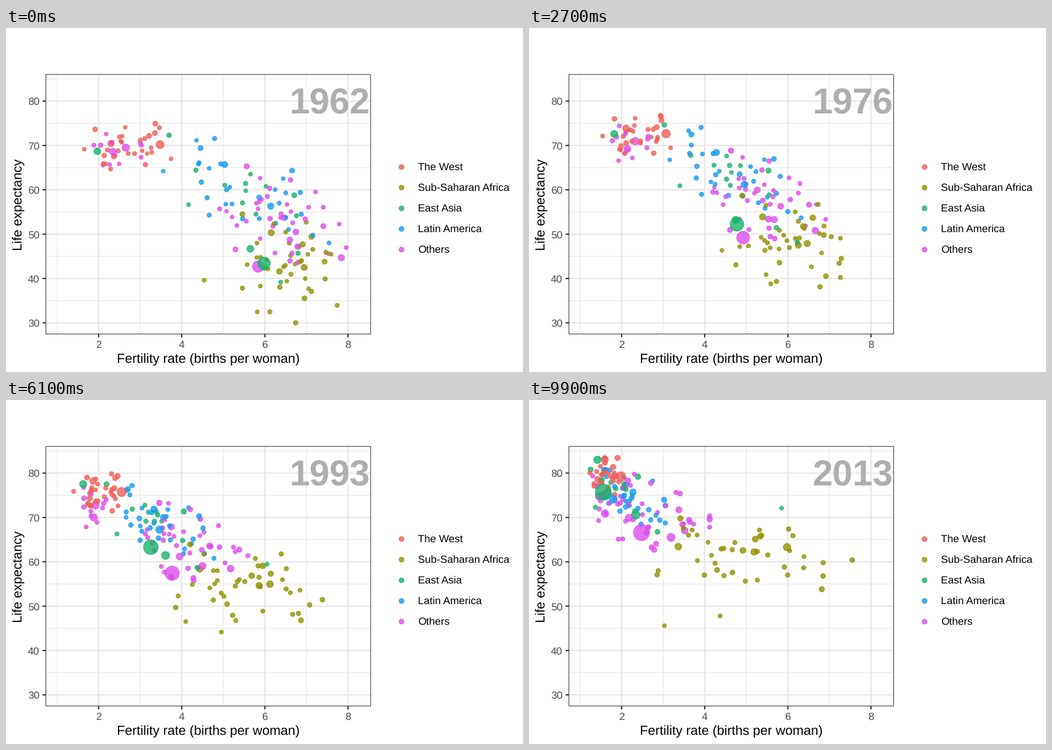
A matplotlib script for the animation above (10000 ms loop, 900 px wide and 600 px high).

```python
import numpy as np
import matplotlib.pyplot as plt
from matplotlib.animation import FuncAnimation
from matplotlib.patches import Rectangle

W, H, DPI = 900, 600, 100
PT = 72 / DPI                      # points per pixel
FRAMES, STEP = 100, 100
FIRST, LAST = 1962, 2013
INK, GRID, TICK = "#333333", "#e6e6e6", "#4d4d4d"
LEFT, RIGHT, TOP, BOTTOM = 69.5, 634.7, 81, 533.7

COLOURS = {
    "The West": "#ef5f58",
    "Sub-Saharan Africa": "#929100",
    "East Asia": "#17b26c",
    "Latin America": "#149af2",
    "Others": "#dd4cec",
}
WEST, AFRICA, ASIA, LATIN, OTHER = COLOURS

# Group, count, fertility-life correlation,
# then mean and spread of (fertility, life) in the first and last year
CLOUDS = [
    (WEST, 30, 0.1, (2.70, 69.8), (0.55, 2.7), (1.62, 79.3), (0.20, 2.2)),
    (AFRICA, 38, -0.2, (6.60, 43.5), (0.60, 5.8), (4.85, 61.8), (1.05, 4.2)),
    (ASIA, 13, -0.7, (5.50, 59.0), (0.95, 7.0), (1.95, 75.5), (0.48, 4.6)),
    (LATIN, 31, -0.6, (5.55, 59.8), (1.05, 6.2), (2.20, 74.6), (0.45, 3.2)),
    (OTHER, 12, -0.2, (2.45, 68.8), (0.38, 2.3), (1.50, 74.6), (0.14, 2.8)),
    (OTHER, 38, -0.5, (6.40, 53.5), (0.82, 6.2), (2.75, 71.0), (0.72, 4.6)),
]

# Large or far-out places: first (fertility, life), last, diameters
LANDMARKS = [
    (LATIN, (6.14, 56.3), (1.80, 74.1), (12, 15)),
    (AFRICA, (6.35, 41.6), (5.98, 63.3), (11, 14)),
    (AFRICA, (6.74, 30.0), (6.85, 59.8), (9, 9)),
    (AFRICA, (7.12, 37.1), (7.55, 60.4), (9, 9.5)),
    (AFRICA, (5.81, 48.0), (3.03, 45.6), (8, 8)),
    (AFRICA, (5.89, 38.3), (4.37, 47.8), (8, 8)),
    (AFRICA, (4.54, 39.6), (4.08, 64.4), (8, 8)),
    (ASIA, (6.38, 39.2), (5.85, 72.1), (8, 8)),
    (ASIA, (1.97, 68.7), (1.42, 83.0), (13, 14)),
    (ASIA, (5.65, 46.7), (2.34, 70.6), (13, 16)),
    (OTHER, (2.34, 68.6), (1.60, 70.9), (13, 14)),
    (OTHER, (6.60, 48.7), (3.19, 65.5), (11, 15)),
    (OTHER, (6.79, 47.2), (2.18, 69.9), (11, 14)),
    (WEST, (3.48, 70.2), (1.98, 79.2), (15, 18)),
    (OTHER, (5.84, 42.7), (2.48, 66.6), (21, 29)),
    (ASIA, (5.98, 43.4), (1.56, 75.7), (23, 29)),
]


def px_x(fertility):
    return 161.2 + (fertility - 2) * 72.36


def px_y(life):
    return 127.5 + (80 - life) * 7.736


def to_px(points):
    return np.column_stack([px_x(points[:, 0]), px_y(points[:, 1])])


def scatter_points(z, corr, mean, spread):
    """Turn independent latents into a correlated, bounded cloud."""
    life = corr * z[:, 0] + np.sqrt(1 - corr ** 2) * z[:, 1]
    shape = np.clip(np.column_stack([z[:, 0], life]), -1.9, 1.9)
    return mean + spread * shape


def latents(rng, n):
    z = rng.normal(size=(n, 2))
    return (z - z.mean(0)) / z.std(0)


def build_dots(seed=12, keep=0.75):
    """Start and end positions, diameters and colours of all dots."""
    rng = np.random.default_rng(seed)
    start, end, size, colours = [], [], [], []
    for group, n, corr, mean0, spread0, mean1, spread1 in CLOUDS:
        z = latents(rng, n)
        later = keep * z + np.sqrt(1 - keep ** 2) * latents(rng, n)
        start.extend(scatter_points(z, corr, mean0, spread0))
        end.extend(scatter_points(later, corr, mean1, spread1))
        first = 7.6 + rng.gamma(1, 0.8, n)
        size.extend(np.column_stack([first, first * 1.08]))
        colours += [COLOURS[group]] * n
    order = list(rng.permutation(len(start)))
    for group, first, last, diameters in LANDMARKS:
        order.append(len(start))
        start.append(first)
        end.append(last)
        size.append(diameters)
        colours.append(COLOURS[group])
    start, end, size = (np.array(a, float)[order] for a in (start, end, size))
    return to_px(start), to_px(end), size, [colours[i] for i in order]


def area(diameter):
    return ((diameter - 1) * PT) ** 2


plt.rcParams["text.hinting"] = "none"
plt.rcParams["path.snap"] = False
fig = plt.figure(figsize=(W / DPI, H / DPI), dpi=DPI, facecolor="white")
ax = fig.add_axes([0, 0, 1, 1])
ax.set(xlim=(0, W), ylim=(H, 0))
ax.axis("off")


def line(xs, ys, width, colour=GRID):
    ax.plot(xs, ys, color=colour, lw=width * PT, zorder=1,
            solid_capstyle="butt")


def label(x, y, text, size, colour="black", **kw):
    return ax.text(x, y, text, size=size * PT, color=colour,
                   family="Liberation Sans", va="baseline", **kw)


def draw_dots(points, diameters, colours):
    return ax.scatter(*points.T, s=area(diameters), c=colours,
                      edgecolors=colours, alpha=0.8,
                      linewidths=1.1 * PT, zorder=3)


def draw_axes():
    for v in range(1, 8, 2):
        line([px_x(v)] * 2, [TOP, BOTTOM], 1.1)
    for v in range(35, 90, 10):
        line([LEFT, RIGHT], [px_y(v)] * 2, 1.1)
    for v in range(2, 9, 2):
        x = px_x(v)
        line([x] * 2, [TOP, BOTTOM], 2.2)
        line([x] * 2, [BOTTOM, BOTTOM + 6], 2.2, INK)
        label(x, 558, str(v), 18.4, TICK, ha="center")
    for v in range(30, 90, 10):
        y = px_y(v)
        line([LEFT, RIGHT], [y] * 2, 2.2)
        line([LEFT - 6, LEFT], [y] * 2, 2.2, INK)
        label(58.5, y + 6.8, str(v), 18.4, TICK, ha="right")
    ax.add_patch(Rectangle((LEFT, TOP), RIGHT - LEFT, BOTTOM - TOP,
                           fill=False, ec=INK, lw=1.1 * PT, zorder=4))
    label(352, 584, "Fertility rate (births per woman)", 23, ha="center")
    label(28, 308, "Life expectancy", 23, ha="center", rotation=90,
          rotation_mode="anchor")


def draw_legend():
    for i, (name, colour) in enumerate(COLOURS.items()):
        y = 241.5 + 36 * i
        draw_dots(np.array([[687.5, y]]), np.array([9.6]), [colour])
        label(717, y + 6.5, name, 18.4)


draw_axes()
draw_legend()
start, end, size, colours = build_dots()
cloud = draw_dots(start, size[:, 0], colours)
year = label(633.5, 149.5, str(FIRST), 63, "#aeaeae", weight="bold",
             ha="right", zorder=2)


def update(i):
    t = i / (FRAMES - 1)
    cloud.set_offsets(start + (end - start) * t)
    cloud.set_sizes(area(size[:, 0] + (size[:, 1] - size[:, 0]) * t))
    year.set_text(str(round(FIRST + (LAST - FIRST) * t)))
    return cloud, year


anim = FuncAnimation(fig, update, frames=FRAMES, interval=STEP,
                     repeat=True, repeat_delay=0, blit=False)
plt.show()
```
